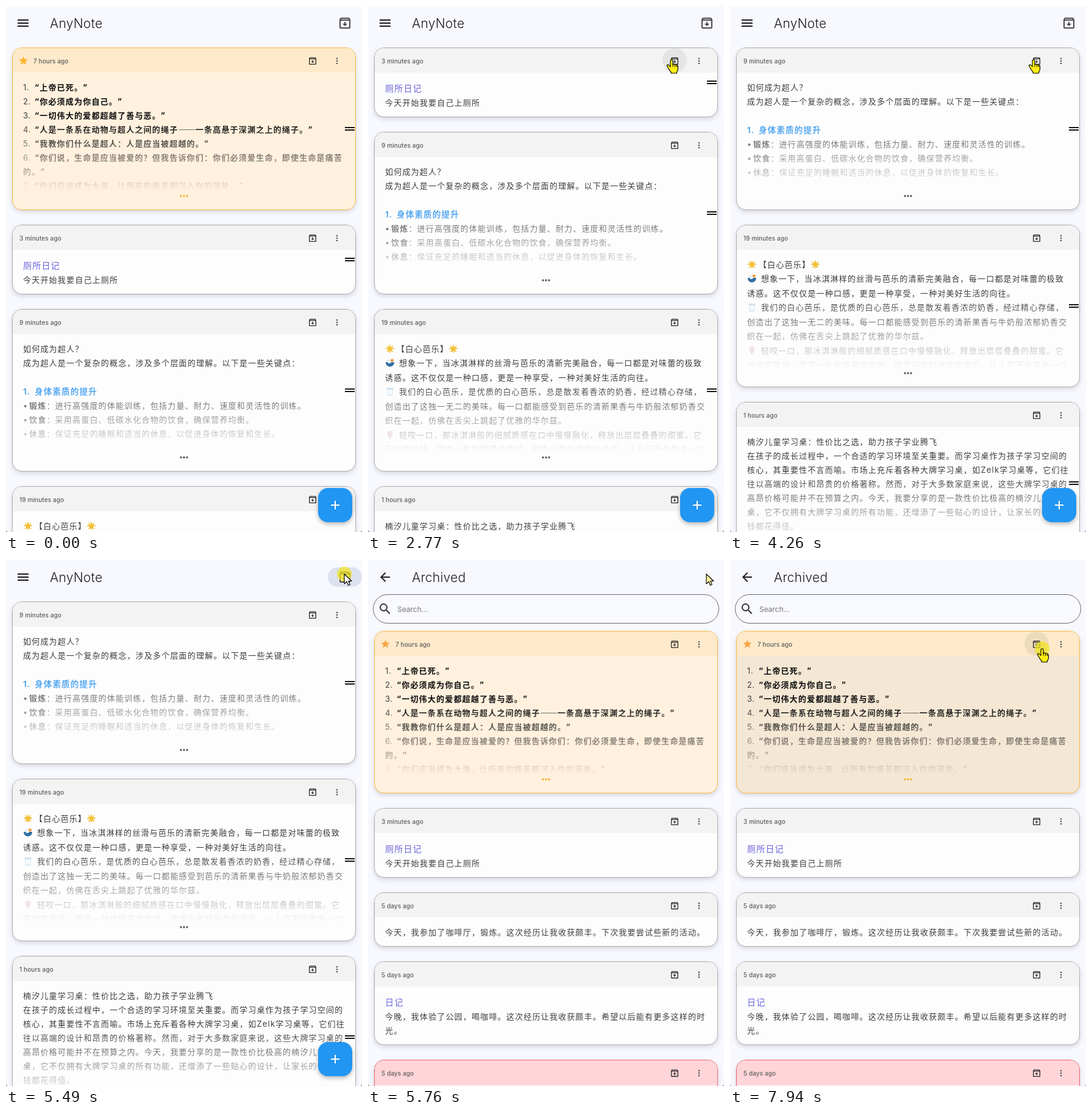
An HTML page that plays this animation: 584 px wide and 861 px high, repeating every 8 s.

```html
<!DOCTYPE html>
<html lang="zh-CN">
<head>
<meta charset="utf-8">
<title>Notes</title>
<style>
html, body { margin: 0; width: 100%; height: 100%; overflow: hidden; background: #666; }
#stage { position: relative; width: 584px; height: 861px; overflow: hidden; border-radius: 0 0 4px 4px;
  font-family: Inter, "Noto Sans CJK SC", "Noto Sans CJK JP", sans-serif; color: #1c1c1e; }
#stage *, #stage *::before { box-sizing: border-box; }
.page { position: absolute; inset: 0; overflow: hidden; background: #f8f9fe; }
h1 { position: absolute; left: 72px; top: 13px; margin: 0; font: 350 21px/32px Inter, sans-serif; letter-spacing: .25px; }
svg { position: absolute; overflow: visible; fill: currentColor; }
.list { position: absolute; left: 10px; top: 68px; width: 564px; }
#arch .list { top: 116px; }

.card { position: relative; height: 266px; margin-bottom: 24px; border: 1px solid #adadad; border-radius: 16px;
  background: #fdfdfd; box-shadow: 0 3px 7px rgba(40, 40, 60, .16); overflow: hidden; }
.card header { position: relative; height: 40px; background: #f3f3f3; color: #444; }
.card time { position: absolute; left: 11px; top: 11px; font: 500 10px/20px Inter, sans-serif; letter-spacing: .1px; color: #5c5c5c; }
.amber { background: #fff1de; border-color: #f8b942; }
.amber header { background: #feeaca; }
.amber time { left: 34px; }
.pink { background: #ffe6e8; border-color: #f0606e; }
.pink header { background: #ffd5d9; }
.tint { position: absolute; inset: 40px 0 0; background: rgba(0, 0, 0, .022); opacity: 0; }
.amber .tint { background: rgba(0, 0, 0, .042); }
.text { position: absolute; left: 17px; top: 40px; right: 0; height: 200px; padding-top: 12.5px; overflow: hidden;
  font-size: 13px; line-height: 23px; letter-spacing: 1.2px; white-space: pre; color: #3d3d3d; text-spacing-trim: space-all; }
.long .text { -webkit-mask-image: linear-gradient(#000 40%, transparent 97%); mask-image: linear-gradient(#000 40%, transparent 97%); }
.airy .text { line-height: 23.5px; }
.text p { margin: 0; height: 1lh; }
.text p.h { font-size: 14px; line-height: 25px; color: #6a63dd; }
.text p.b { font-size: 13.5px; line-height: 24px; font-weight: 700; color: #3f9df0; }
.text b { font-weight: 700; }
.amber b { color: #0c0c0c; }
.text i { font: 700 14.2px "Noto Sans CJK SC", "Noto Sans CJK JP", sans-serif; line-height: 1; letter-spacing: 0; }
.num, .dot { display: inline-block; width: 19px; letter-spacing: .6px; }
.dot { width: 10px; }
.emo { display: inline-block; position: relative; width: 19px; height: 16px; vertical-align: -3px; letter-spacing: 0; }
.emo.gap { width: 23px; }

.fab { position: absolute; left: 512px; top: 789px; width: 56px; height: 56px; border-radius: 16px; background: #2196f3;
  color: #fff; box-shadow: 0 3px 7px rgba(0, 0, 0, .28); }
.thumb { position: absolute; left: 574px; top: 56px; width: 8px; height: 112px; border-radius: 4px; background: #dcdce0; }
.halo { position: absolute; left: 483px; top: 69px; width: 40px; height: 40px; border-radius: 50%; background: rgba(0, 0, 0, .1); }
#arch .halo { top: 117px; background: rgba(0, 0, 0, .065); }
.pill { position: absolute; left: 528px; top: 12px; width: 56px; height: 32px; border-radius: 16px; background: #dde2ee; }
.scrim { position: absolute; inset: 0; background: #000; }
.search { position: absolute; left: 8px; top: 56px; width: 568px; height: 48px; border: 1px solid #6a6a70; border-radius: 24px;
  background: #f9faff; font: 400 12px/48px Inter, sans-serif; padding-left: 39px; color: #777; }

#cursor { position: absolute; left: 0; top: 0; width: 0; height: 0; }
#cursor svg { stroke: #000; stroke-width: 1.1; stroke-linejoin: round; width: 1px; height: 1px; }
#cursor .hand { fill: #ffee12; }
.click { position: absolute; left: -12px; top: -12px; width: 24px; height: 24px; border-radius: 50%; background: rgba(240, 226, 30, .74); }

/* one 8 s loop, 1% = 80 ms */
.list.moving, .thumb, .halo, .pill, .scrim, #arch, #cursor, .click, .hand, .arrow, .t1, .t2, .t3, .c1, .c2 {
  animation: 8s -15ms infinite step-end both; }
.moving { animation-name: shift !important; }
.c1 { animation-name: gone1 !important; }
.c2 { animation-name: gone2 !important; }
.t1 { animation-name: tint1 !important; }
.t2 { animation-name: tint2 !important; }
.t3, #arch .halo { animation-name: late !important; }
.thumb { animation-name: thumb; }
.halo { animation-name: halo; }
.pill { animation-name: pill; }
.scrim { animation-name: scrim; animation-timing-function: linear; }
#arch { animation-name: zoom; }
#cursor { animation-name: move; animation-timing-function: ease-in-out; }
.click { animation-name: click; }
.hand { animation-name: hand; }
.arrow { animation-name: arrow; }

@keyframes shift { 0% { transform: none } 28.25% { transform: translateY(-290px) } 53.25%, 100% { transform: translateY(-428px) } }
@keyframes gone1 { 0% { opacity: 1 } 28.25%, 100% { opacity: 0 } }
@keyframes gone2 { 0% { opacity: 1 } 53.25%, 100% { opacity: 0 } }
@keyframes tint1 { 0% { opacity: 0 } 17% { opacity: 1 } 28.25%, 100% { opacity: 0 } }
@keyframes tint2 { 0% { opacity: 0 } 39.625% { opacity: 1 } 53.25%, 100% { opacity: 0 } }
@keyframes late { 0% { opacity: 0 } 80.5%, 100% { opacity: 1 } }
@keyframes thumb { 0% { opacity: 0 } 20.9% { opacity: 1 } 24% { opacity: .5 } 25.125%, 100% { opacity: 0 } }
@keyframes halo { 0% { opacity: 0 } 20.9% { opacity: .6 } 24% { opacity: 1 } 28.25% { opacity: 0 }
  34.625% { opacity: .6 } 49% { opacity: .8 } 50% { opacity: 1 } 53.25%, 100% { opacity: 0 } }
@keyframes pill { 0% { opacity: 0 } 67.125%, 100% { opacity: 1 } }
@keyframes scrim { 0%, 69.375% { opacity: 0 } 72%, 100% { opacity: .2 } }
@keyframes zoom {
  0% { opacity: 0; transform: scale(.85) }
  69.375% { opacity: 0; transform: scale(.85); animation-timing-function: cubic-bezier(.16, 1, .3, 1) }
  70.8% { opacity: 1 }
  72.75%, 100% { opacity: 1; transform: none }
}
@keyframes move {
  0% { transform: translate(576px, 777px); visibility: hidden }
  14.36% { transform: translate(576px, 777px); visibility: hidden }
  14.375% { transform: translate(576px, 777px); visibility: visible; animation-timing-function: cubic-bezier(.25, .55, .4, 1) }
  21.4%, 28% { transform: translate(497px, 88px) }
  34.6%, 59% { transform: translate(498px, 88px) }
  61.25%, 76.25% { transform: translate(555px, 23px) }
  81.875%, 84.125% { transform: translate(512px, 152px) }
  84.875%, 100% { transform: translate(512px, 145px); visibility: visible }
}
@keyframes click { 0% { opacity: 0 } 24% { opacity: 1 } 25.125% { opacity: 0 } 49% { opacity: 1 } 51.25% { opacity: 0 }
  67.875% { opacity: 1 } 69.375% { opacity: 0 } 99.25%, 100% { opacity: 1 } }
@keyframes hand { 0% { opacity: 0 } 20.2% { opacity: 1 } 59.8% { opacity: 0 } 80.5%, 100% { opacity: 1 } }
@keyframes arrow { 0% { opacity: 1; fill: #fff } 20.2% { opacity: 0; fill: #fff } 59.8% { opacity: 1; fill: #fff }
  69.375% { opacity: 1; fill: #fdf1a4 } 80.5%, 100% { opacity: 0; fill: #fdf1a4 } }
</style>
</head>
<body>
<div id="stage">
  <div class="page" id="main"></div>
  <div class="scrim"></div>
  <div class="page" id="arch"></div>
  <div id="cursor">
    <div class="click"></div>
    <svg class="arrow"><path d="M0 0v16l4-3.5 2.5 6 2.8-1.2-2.6-5.8h5.3z"/></svg>
    <svg class="hand"><path d="M-2 2a2 2 0 0 1 4 0v5.5q2-1 3.6.4q2-.6 3 .8q1.9-.2 1.9 1.8v4.5q0 3-2 5v2h-9.5v-2q-2.5-2.5-4.5-6.5q-1.3-2.6-2-3.6q-.2-2 1.8-1.8q1.6.6 3.7 3.4z"/><path d="M2.2 7.5v4M5.6 8.2v3.5M8.5 9v3" fill="none"/></svg>
  </div>
</div>
<script>
const box = 'M20.54 5.23l-1.39-1.68C18.88 3.21 18.47 3 18 3H6c-.47 0-.88.21-1.16.55L3.46 5.23C3.17 5.57 3 6.02 3 6.5V19c0 1.1.9 2 2 2h14c1.1 0 2-.9 2-2V6.5c0-.48-.17-.93-.46-1.27zM6.24 5h11.52l.83 1H5.42zM5 19V8h14v11z';
const dot = (x, y) => `M${x - 2} ${y}a2 2 0 1 0 4 0a2 2 0 1 0-4 0z`;
const paths = {
  menu: 'M3 6h18v2H3zM3 11h18v2H3zM3 16h18v2H3z',
  back: 'M20 11H7.83l5.59-5.59L12 4l-8 8 8 8 1.41-1.41L7.83 13H20z',
  down: box + 'M13 10h-2v3H8l4 4 4-4h-3z',
  up: box + 'M11 17h2v-3h3l-4-4-4 4h3z',
  vert: dot(12, 6) + dot(12, 12) + dot(12, 18),
  horiz: dot(6, 12) + dot(12, 12) + dot(18, 12),
  drag: 'M4 9h16v2H4zM4 13h16v2H4z',
  plus: 'M11 5h2v6h6v2h-6v6h-2v-6H5v-2h6z',
  star: 'M12 17.27L18.18 21l-1.64-7.03L22 9.24l-7.19-.61L12 2 9.19 8.63 2 9.24l5.46 4.73L5.82 21z',
  search: 'M15.5 14h-.79l-.28-.27A6.47 6.47 0 0 0 16 9.5 6.5 6.5 0 1 0 9.5 16c1.61 0 3.09-.59 4.23-1.57l.27.28v.79l5 4.99L20.49 19zM9.5 14a4.5 4.5 0 1 1 0-9 4.5 4.5 0 0 1 0 9z'
};
// icon centred on x, y
const icon = (name, size, x, y, color = 'inherit') =>
  `<svg viewBox="0 0 24 24" width="${size}" height="${size}" style="left:${x - size / 2}px;top:${y - size / 2}px;color:${color}"><path fill-rule="evenodd" d="${paths[name]}"/></svg>`;

const art = {
  sun: `<g stroke="#efc04a" stroke-width="1.3"><path d="M8 1v14M1 8h14M3 3l10 10M13 3L3 13"/></g><path fill="#f3c02f" transform="translate(.8 .8) scale(.6)" d="${paths.star}"/>`,
  bowl: '<circle cx="6" cy="5.5" r="3.5" fill="#e8f0f6"/><circle cx="11.5" cy="4" r="2.5" fill="#f0a040"/><path fill="#2f6fa5" d="M1 7h14q0 7-7 7.500q-7-.5-7-7.500z"/><path fill="#f4f8fc" d="M4 6h6q0 3-3 3t-3-3z"/>',
  glass: '<path fill="#c5dff0" d="M2.500 2h11l-1.500 13H4z"/><path fill="#f4f9fd" d="M3.600 5h8.800l-1 8.500H4.600z"/>',
  cone: '<circle cx="8" cy="6" r="4.500" fill="#d8a8b4"/><path fill="#b99a78" d="M4.500 9h7L8 15.500z"/>'
};
const emo = (name, cls = '') => `<span class="emo ${cls}"><svg viewBox="0 0 16 16" width="16" height="16" style="left:0;top:0">${art[name]}</svg></span>`;
const num = n => `<span class="num">${n}.</span>`;
const p = (s, cls = '') => `<p class="${cls}">${s}</p>`;
const item = (n, s) => p(`${num(n)}<b>${s}</b>`);
const bullet = (k, s) => p(`<span class="dot">•</span><b>${k}</b>：${s}`);

const quotes = ['“上帝已死。”', '“你必须成为你自己。”', '“一切伟大的爱都超越了善与恶。”',
  '“人是一条系在动物与超人之间的绳子<i>——</i>一条高悬于深渊之上的绳子。”', '“我教你们什么是超人：人是应当被超越的。”',
  '“你们说，生命是应当被爱的？但我告诉你们：你们必须爱生命，即使生命是痛苦'].map((s, i) => item(i + 1, s)).join('')
  + p('<b>的。”</b>') + item(7, '“你们应当成为大海，让所有的痛苦都沉入你的深处。”');
const diary = p('厕所日记', 'h') + p('今天开始我要自己上厕所');
const hero = p('如何成为超人？') + p('成为超人是一个复杂的概念，涉及多个层面的理解。以下是一些关键点：') + p('')
  + p(num(1) + '身体素质的提升', 'b')
  + bullet('锻炼', '进行高强度的体能训练，包括力量、耐力、速度和灵活性的训练。')
  + bullet('饮食', '采用高蛋白、低碳水化合物的饮食，确保营养均衡。')
  + bullet('休息', '保证充足的睡眠和适当的休息，以促进身体的恢复和生长。');
const guava = p(emo('sun') + '【白心芭乐】' + emo('sun'))
  + p(emo('bowl', 'gap') + '想象一下，当冰淇淋样的丝滑与芭乐的清新完美融合，每一口都是对味蕾的极致')
  + p('诱惑。这不仅仅是一种口感，更是一种享受，一种对美好生活的向往。')
  + p(emo('glass', 'gap') + '我们的白心芭乐，是优质的白心芭乐，总是散发着香浓的奶香，经过精心存储，')
  + p('创造出了这独一无二的美味。每一口都能感受到芭乐的清新果香与牛奶般浓郁奶香交')
  + p('织在一起，仿佛在舌尖上跳起了优雅的华尔兹。')
  + p(emo('cone', 'gap') + '轻咬一口，那冰淇淋般的细腻质感在口中慢慢融化，释放出层层叠叠的甜蜜。它')
  + p('不仅是美味，更是一种能够带来愉悦、健康与美好并存的享受，让人忍不住再来一口');
const desk = ['楠汐儿童学习桌：性价比之选，助力孩子学业腾飞',
  '在孩子的成长过程中，一个合适的学习环境至关重要。而学习桌作为孩子学习空间的',
  '核心，其重要性不言而喻。市场上充斥着各种大牌学习桌，如Zelk学习桌等，它们往',
  '往以高端的设计和昂贵的价格著称。然而，对于大多数家庭来说，这些大牌学习桌的',
  '高昂价格可能并不在预算之内。今天，我要分享的是一款性价比极高的楠汐儿童学习',
  '桌，它不仅拥有大牌学习桌的所有功能，还增添了一些贴心的设计，让家长的每一分',
  '钱都花得值。'].map(s => p(s)).join('');
const cafe = p('今天，我参加了咖啡厅，锻炼。这次经历让我收获颇丰。下次我要尝试些新的活动。');
const park = p('日记', 'h') + p('今晚，我体验了公园，喝咖啡。这次经历让我收获颇丰。希望以后能有更多这样的时') + p('光。');

function card({ age, text, cls = '', tint = '', h = 266 }, archived) {
  const amber = cls.includes('amber'), long = cls.includes('long');
  return `<div class="card ${cls}" style="height:${h}px"><header>
    ${amber ? icon('star', 17, 17.5, 20.5, archived ? '#f9a648' : '#fbb52c') : ''}<time>${age} ago</time>
    ${icon(archived ? 'up' : 'down', 16, 492, 20.5, '#2c2c2c')}${icon('vert', 16, 532, 20.5, '#555')}</header>
    <div class="tint ${tint}"></div><div class="text">${text}</div>
    ${long ? icon('horiz', 20, 281, 242, amber ? '#f8b02c' : '#555') : ''}
    ${archived ? '' : icon('drag', 24, 553, h / 2 - 1, '#161616')}</div>`;
}
const list = (cards, archived, cls = '') => `<div class="list ${cls}">${cards.map(c => card(c, archived)).join('')}</div>`;
const fill = (id, html) => { document.getElementById(id).innerHTML = html; };

fill('main', list([
  { age: '7 hours', text: quotes, cls: 'amber long c1', tint: 't1' },
  { age: '3 minutes', text: diary, cls: 'c2', tint: 't2', h: 114 },
  { age: '9 minutes', text: hero, cls: 'long' },
  { age: '19 minutes', text: guava, cls: 'long airy' },
  { age: '1 hours', text: desk, cls: 'long' }
], false, 'moving') + `<div class="halo"></div><div class="pill"></div>${icon('menu', 24, 28, 28)}<h1>AnyNote</h1>
  ${icon('down', 24, 556, 28, '#4a4a4e')}<div class="thumb"></div><div class="fab">${icon('plus', 24, 28, 28)}</div>`);

fill('arch', list([
  { age: '7 hours', text: quotes, cls: 'amber long', tint: 't3' },
  { age: '3 minutes', text: diary, h: 114 },
  { age: '5 days', text: cafe, h: 89 },
  { age: '5 days', text: park, h: 137 },
  { age: '5 days', text: '', cls: 'pink', h: 137 }
], true) + `<div class="halo"></div>${icon('back', 24, 28, 28)}<h1>Archived</h1>
  <div class="search">Search...</div>${icon('search', 24, 28, 80, '#333')}`);
</script>
</body>
</html>
```
